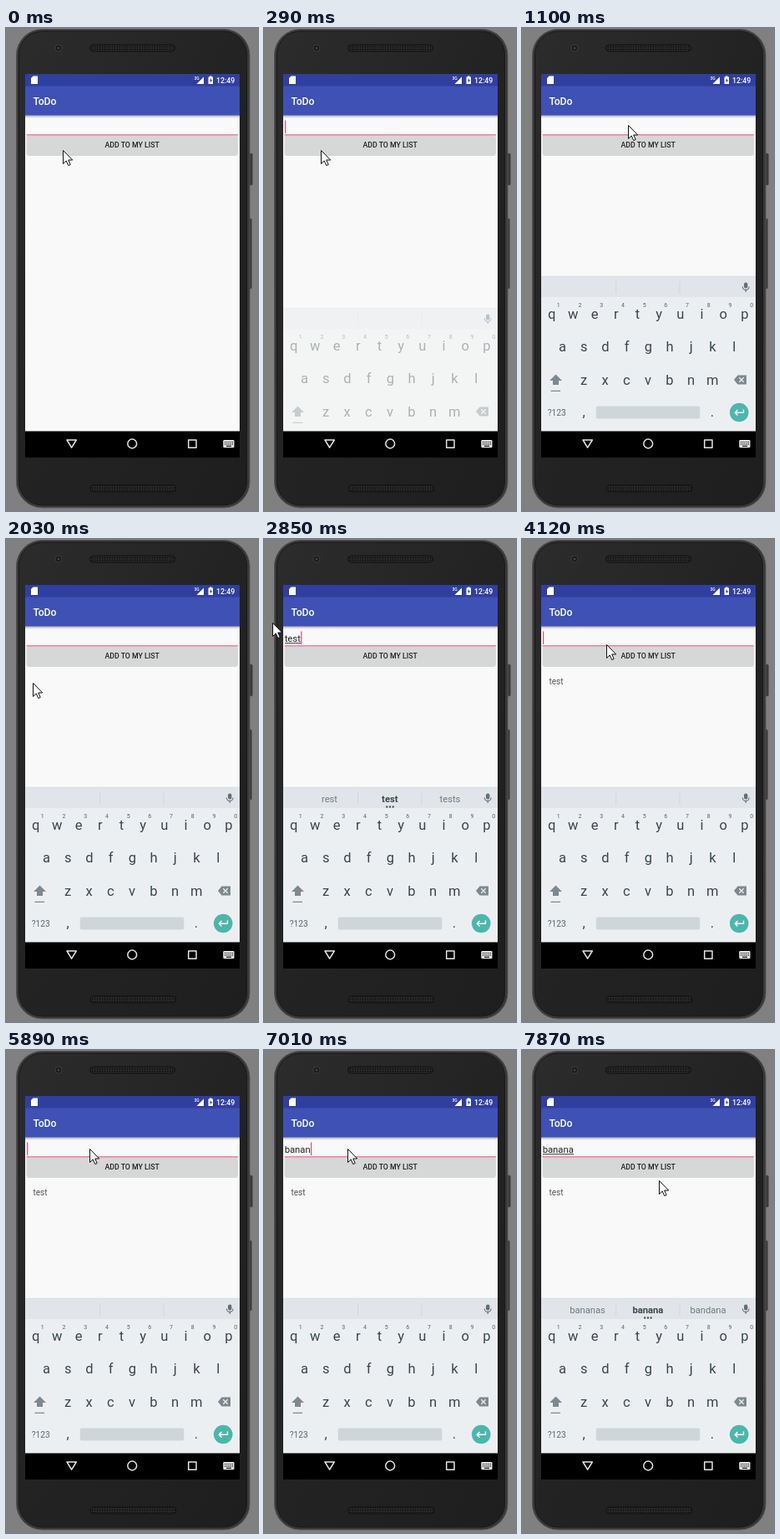
An HTML page that plays this animation: 302x578 px, repeating every 7.99 s.

```html
<!DOCTYPE html>
<html lang="en">
<head>
<meta charset="utf-8">
<title>ToDo</title>
<style>
  html, body { margin: 0; width: 100%; height: 100%; overflow: hidden; background: #808080; }
  svg { display: block; width: 100%; height: 100%; }
  text { font-family: Roboto, "Noto Sans", sans-serif; white-space: pre; }
  .mid, #keys text, #hints text, #words text { text-anchor: middle; }
  .bold { font-weight: 500; }
  #keys { font-size: 16.5px; fill: #37474f; }
  #hints { font-size: 7px; fill: #54646c; }
  #words { font-size: 11.2px; fill: #6d7b82; }
  #words .bold { fill: #37474f; font-weight: 700; }
</style>
</head>
<body>
<svg viewBox="0 0 302 578">
  <defs>
    <linearGradient id="body" x2="1" y2="1">
      <stop offset="0" stop-color="#2c2c2c"/>
      <stop offset=".5" stop-color="#232323"/>
      <stop offset="1" stop-color="#1e1e1e"/>
    </linearGradient>
    <linearGradient id="shade" x2="0" y2="1">
      <stop offset="0" stop-color="#000" stop-opacity=".32"/>
      <stop offset="1" stop-color="#000" stop-opacity="0"/>
    </linearGradient>
    <pattern id="mesh" width="3" height="3" patternUnits="userSpaceOnUse">
      <rect width="3" height="3" fill="#2a2a2a"/>
      <circle cx="1.5" cy="1.5" r="1" fill="#0e0e0e"/>
    </pattern>
    <clipPath id="screen"><rect x="23" y="55" width="257" height="427.5"/></clipPath>
  </defs>

  <!-- phone -->
  <rect width="302" height="578" fill="#808080"/>
  <g fill="#3a3a3a" stroke="#555" stroke-width=".5">
    <rect x="290" y="150" width="5.5" height="38" rx="1.5"/>
    <rect x="290" y="228" width="4.5" height="84" rx="1.5"/>
  </g>
  <rect x="12.5" y="1.5" width="279.5" height="572.5" rx="31" fill="#383838" stroke="#505050"/>
  <rect x="15.5" y="4" width="273" height="567" rx="28" fill="url(#body)" stroke="#181818"/>
  <g fill="url(#mesh)" stroke="#111">
    <rect x="100.500" y="20" width="102" height="8" rx="4"/>
    <rect x="101" y="547" width="103" height="8" rx="4"/>
  </g>
  <circle cx="63" cy="24" r="4" fill="#1a1a1a" stroke="#3c3c3c"/>
  <circle cx="63" cy="24" r="1.5" fill="#3e4148"/>

  <!-- app -->
  <rect x="23" y="55" width="257" height="428" fill="#f9f9f9"/>
  <rect x="23" y="104" width="257" height="4" fill="url(#shade)"/>
  <rect x="23" y="69" width="257" height="35.500" fill="#3f51b5"/>
  <rect x="23" y="55" width="257" height="14.500" fill="#303f9f"/>
  <g fill="#fff">
    <path d="M32.500 57.500H38V67H30V60Z"/>
    <path d="M237 58.500V67H228.500Z"/>
    <text x="225.500" y="62" font-size="5" class="bold">3G</text>
    <path d="M244 57.500h2.500v1h1.500V67h-5.500v-8.500H244Z"/>
    <path d="M245.800 60l-2 3.200h1.400v2.300l2-3.200h-1.400Z" fill="#303f9f"/>
    <text x="252" y="65.500" font-size="8.750" class="bold">12:49</text>
    <text x="32.500" y="91.500" font-size="12.200" class="bold">ToDo</text>
  </g>
  <rect x="25" y="130.500" width="252.500" height="22.500" rx="2" fill="#000" opacity=".14"/>
  <rect id="button" x="24.500" y="128.500" width="253.300" height="23.500" rx="2" fill="#d6d7d7"/>
  <rect x="24.500" y="127" width="253.500" height="1.700" fill="#ee86a8"/>
  <text x="151.200" y="143.200" font-size="8.750" class="mid bold" fill="#222">ADD TO MY LIST</text>
  <text id="entry" x="24.700" y="123" font-size="11.250" fill="#222"></text>
  <rect id="line" x="25" y="124.200" height="1" fill="#333"/>
  <rect id="caret" y="110.500" width="1.200" height="15.500" fill="#e5487b"/>
  <text id="item" x="32.500" y="173.800" font-size="10" fill="#555">test</text>

  <!-- keyboard -->
  <g clip-path="url(#screen)">
    <g id="board">
      <rect x="23" y="297" width="257" height="190" fill="#eceff1"/>
      <rect x="23" y="297" width="257" height="25" fill="#e1e5e9"/>
      <path d="M23 297.200H280" stroke="#d5dadd" stroke-width=".6"/>
      <path d="M112.700 303V318M189 303V318" stroke="#cdd4d8" stroke-width=".8"/>
      <g id="words">
        <text x="78.500" y="314.600"></text>
        <text x="150.800" y="314.600" class="bold"></text>
        <text x="223" y="314.600"></text>
        <path d="M146.200 320.500h9.500" stroke="#37474f" stroke-width="1.900" stroke-dasharray="2.100 1.600"/>
      </g>
      <g fill="none" stroke="#5f7078" stroke-width="1.100">
        <rect x="266.600" y="305" width="3.300" height="6" rx="1.600" fill="#5f7078"/>
        <path d="M264.300 309.500a3.900 3.900 0 0 0 7.800 0M268.200 313.300V316"/>
      </g>
      <g id="hints"></g>
      <g id="keys"></g>
      <path d="M40.500 414.500L48 422H44V427H37V422H33Z" fill="#7d898f"/>
      <path d="M34.500 434.300H46" stroke="#7d898f" stroke-width="1.200"/>
      <path d="M258.500 415.500H269V426.500H258.500L254 421Z" fill="#7d898f"/>
      <path d="M260.300 418.300l5.400 5.400m0-5.400l-5.400 5.400" stroke="#eceff1" stroke-width="1.300"/>
      <text x="41.700" y="463.700" font-size="10.200" class="mid" fill="#5c6b73">?123</text>
      <rect x="88.700" y="452.500" width="124.600" height="15" rx="2" fill="#cfd6da"/>
      <circle cx="260.200" cy="460" r="11.300" fill="#4db6ac"/>
      <path d="M265.500 456.500V460.300H255.500M258.500 457l-3.300 3.300 3.300 3.300" fill="none" stroke="#fff" stroke-width="1.400"/>
    </g>
  </g>

  <!-- navigation bar -->
  <rect x="23" y="482.500" width="257" height="31.500" fill="#000"/>
  <g fill="none" stroke="#e4e4e4" stroke-width="1.500" stroke-linejoin="round">
    <path d="M73 493H84.300L78.600 502.200Z"/>
    <circle cx="151.200" cy="497.500" r="5.400"/>
    <rect x="218.700" y="493" width="9.300" height="9.300"/>
  </g>
  <rect x="260.300" y="493" width="13.200" height="9.200" rx="1.200" fill="#e4e4e4"/>
  <path d="M262 495.500H272M262 497.900H272" stroke="#000" stroke-width="1.200" stroke-dasharray="1.200 1"/>
  <path d="M264 500.300H270" stroke="#000" stroke-width="1.100"/>

  <path id="mouse" d="M.5.500V16.500L4.200 13 6.800 18.600 9.200 17.500 6.700 12H11.700Z" fill="#fff" stroke="#111" stroke-linejoin="round"/>
</svg>
<script>
  const LOOP = 7990;
  const $ = id => document.getElementById(id);

  // Each track holds [time, value...] steps; a value stays until the next one.
  const mouse = [
    [0, 68, 146], [560, 72, 180], [710, 96, 150], [830, 126, 112], [980, 129, 103],
    [1100, 127, 116], [1250, 110, 142], [1370, 88, 168], [1490, 69, 184], [1640, 65, 168],
    [1760, 62, 149], [1910, 44, 161], [2030, 32, 172], [2730, 22, 140], [2850, 10, 100],
    [2970, 3, 75], [3120, 42, 98], [3240, 88, 124], [3360, 124, 143], [3880, 118, 139],
    [4000, 109, 132], [4120, 101, 126], [4270, 99, 118], [5230, 100, 118], [7440, 184, 131],
    [7720, 168, 144], [7870, 164, 156]
  ];
  const caret = [
    [0, 0], [290, 1], [830, 0], [1250, 1], [1760, 0], [2340, 1], [3240, 0], [3880, 1],
    [4550, 0], [4950, 1], [5480, 0], [5890, 1], [7720, 0]
  ];
  const entry = [
    [0, ""], [2340, "t"], [2460, "te"], [2580, "tes"], [2730, "test"], [4000, ""],
    [6350, "b"], [6500, "ba"], [6650, "ban"], [6770, "bana"], [6890, "banan"], [7020, "banana"]
  ];
  const line = [[0, 0], [2850, 1], [4000, 0], [7290, 1]];
  const words = [[0], [2850, "rest", "test", "tests"], [4000], [7140, "bananas", "banana", "bandana"]];
  const board = [[0, 190, 0], [290, 38, .4], [440, 8, .9], [560, 0, 1]];
  const button = [[0, "#d6d7d7"], [3880, "#c3c4c4"], [4000, "#cccdcd"], [4120, "#d6d7d7"]];

  const at = (track, t) => track.findLast(step => step[0] <= t).slice(1);

  function label(parent, text, x, y) {
    const el = document.createElementNS("http://www.w3.org/2000/svg", "text");
    el.setAttribute("x", x);
    el.setAttribute("y", y);
    el.textContent = text;
    $(parent).append(el);
  }

  const PITCH = 25.7;
  const row = (chars, x, y, parent = "keys") =>
    [...chars].forEach((c, i) => label(parent, c, x + i * PITCH, y));
  row("qwertyuiop", 35.6, 348);
  row("asdfghjkl", 48.6, 387.3);
  row("zxcvbnm", 74, 426.5);
  row("1234567890", 43.8, 334, "hints");
  label("keys", ",", 74, 464.5);
  label("keys", ".", 228, 464.5);

  function draw(t) {
    const [mx, my] = at(mouse, t);
    $("mouse").setAttribute("transform", `translate(${mx} ${my})`);

    const [text] = at(entry, t);
    $("entry").textContent = text;
    const width = text ? $("entry").getComputedTextLength() : 0;
    $("line").setAttribute("width", at(line, t)[0] * width);
    $("caret").setAttribute("x", 25 + width);
    $("caret").setAttribute("opacity", at(caret, t)[0]);

    const list = at(words, t);
    $("words").querySelectorAll("text").forEach((el, i) => el.textContent = list[i] || "");
    $("words").setAttribute("opacity", list.length ? 1 : 0);

    const [drop, alpha] = at(board, t);
    $("board").setAttribute("transform", `translate(0 ${drop})`);
    $("board").setAttribute("opacity", alpha);

    $("button").setAttribute("fill", at(button, t)[0]);
    $("item").setAttribute("opacity", t >= 4000 ? 1 : 0);
  }

  const begin = performance.now();
  function tick() {
    draw((performance.now() - begin) % LOOP);
    requestAnimationFrame(tick);
  }
  tick();
</script>
</body>
</html>
```
